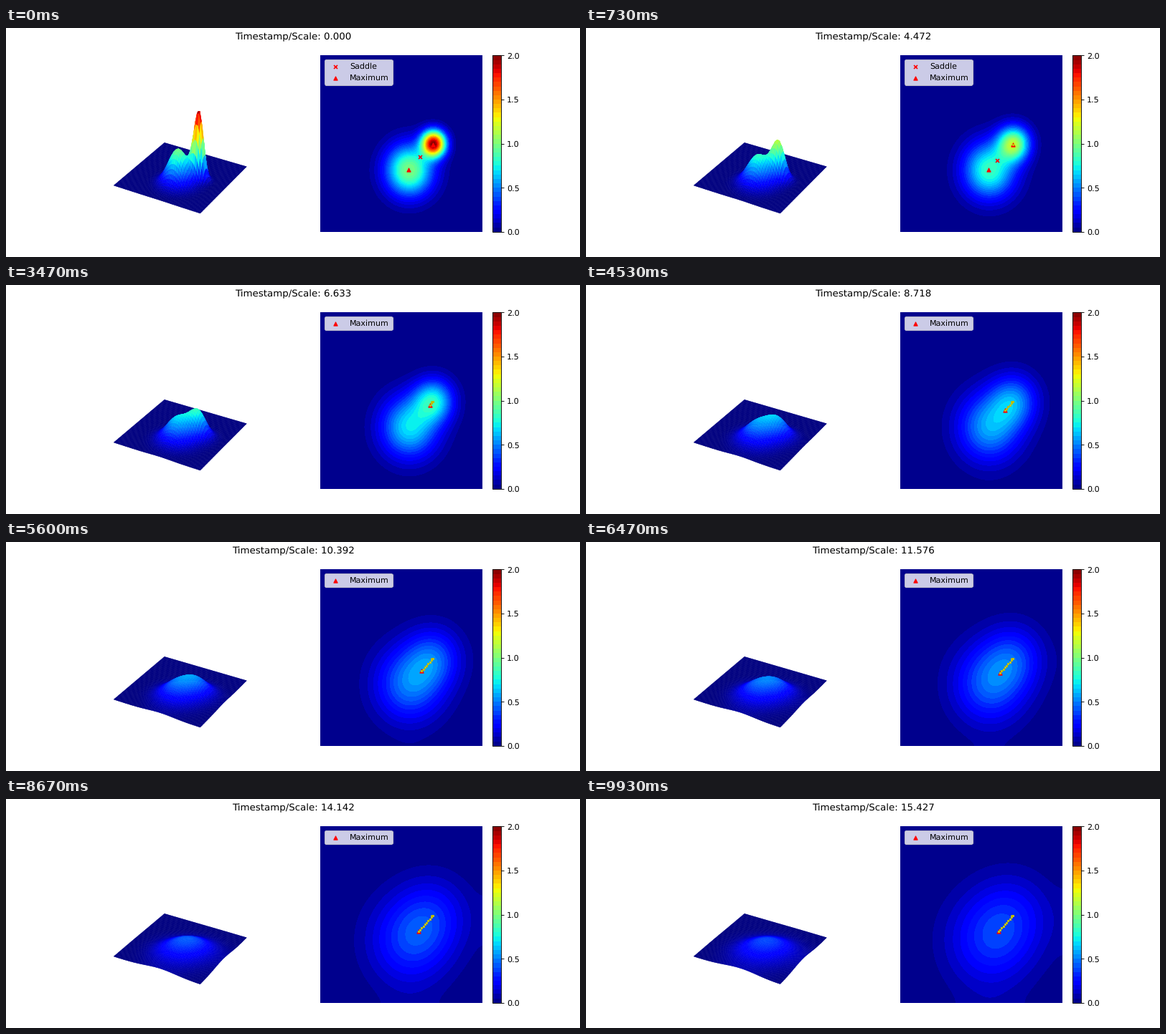
A matplotlib script for the animation above (9990 ms loop, 800 by 320 pixels).

```python
import numpy as np
import matplotlib.pyplot as plt
from matplotlib.animation import FuncAnimation
from matplotlib.collections import PolyCollection
from matplotlib.colors import Normalize

plt.rcParams['text.hinting'] = 'none'

N = 100
FRAMES, LOOP_MS = 150, 9990
EVENT, HOLD = 19, 30            # step of the collapse, extra frames it is held

grid = np.linspace(0, 100, N)
STEP = grid[1]
TALL, WIDE = np.array([70, 50]), np.array([55, 35])
BLOBS = [(1.9, TALL, 5), (1.0, WIDE, 10)]       # amplitude, centre, sigma
LEVELS = np.linspace(0, 2, 41)

norm = Normalize(0, 2)
cmap = plt.get_cmap('jet')


def bell(c, var):
    """1D Gaussian on the grid, reflected at both borders."""
    images = (c, -STEP - c, 200 + STEP - c)
    return sum(np.exp(-(grid - m) ** 2 / (2 * var)) for m in images)


def spread(sigma, k):
    return sigma ** 2 + 2 * k * STEP ** 2


def field(k):
    z = 0
    for amp, (cx, cy), sigma in BLOBS:
        var = spread(sigma, k)
        z = z + amp * sigma ** 2 / var * np.outer(bell(cy, var), bell(cx, var))
    return z


def snap(p):
    return np.round(np.asarray(p) / STEP) * STEP


def along(u):
    return snap(WIDE + u * (TALL - WIDE))


STAR = along(.235)


def ridge_points(k):
    """Lower maximum and saddle, sampled on the line joining the two centres."""
    u = np.arange(13) / 15
    dist = np.hypot(*(TALL - WIDE))
    f = 0
    for (amp, _, sigma), pos in zip(BLOBS, (1, 0)):
        var = spread(sigma, k)
        f = f + amp * sigma ** 2 / var * np.exp(-((u - pos) * dist) ** 2 / (2 * var))
    down = np.flatnonzero(np.diff(f) < 0)
    if not len(down):
        return STAR, STAR
    return along(u[down[0]]), along(u[down[-1] + 1])


def top_point(z):
    row, col = np.unravel_index(z.argmax(), z.shape)
    return grid[col], grid[row]


def project(x, y, z):
    """Perspective view (elev 30, azim -60) to stage pixels."""
    s3 = np.sqrt(3) / 2
    x, y = (x / 50 - 1) * .5195, (y / 50 - 1) * .5195
    z = (z - 1) * .4286
    depth = 10 - (s3 * (x / 2 - s3 * y) + z / 2)
    px = 244.24 + 1331.9 * (s3 * x + y / 2) / depth
    py = 158.27 - 1331.9 * (-x / 4 + s3 / 2 * y + s3 * z) / depth
    return px, py


# coarse mesh for the surface, quads ordered back to front
pick = np.r_[0:N - 1:2, N - 1]
mx, my = np.meshgrid(grid[pick], grid[pick])


def corners(a):
    quads = [a[:-1, :-1], a[:-1, 1:], a[1:, 1:], a[1:, :-1]]
    return np.stack([q.ravel() for q in quads], axis=1)


order = np.argsort((corners(mx) / 2 - np.sqrt(3) / 2 * corners(my)).mean(axis=1),
                   kind='stable')

fields = [field(k) for k in range(FRAMES - HOLD)]
tops = np.array([top_point(z) for z in fields])

fig = plt.figure(figsize=(10, 4), dpi=80)
title = fig.suptitle('')

view = fig.add_axes([0, 0, 1, 1], zorder=-1)
view.set(xlim=(0, 800), ylim=(320, 0))
view.axis('off')
surface = PolyCollection([], linewidths=.4, edgecolors='face')
view.add_collection(surface, autolim=False)

ax = fig.add_subplot(122)


def draw_map(z):
    return ax.contourf(grid, grid, np.clip(z, 1e-9, 1.9999), LEVELS,
                       cmap=cmap, norm=norm)


heat = draw_map(fields[0])
bar = fig.colorbar(heat, ax=ax, ticks=np.arange(0, 2.1, .5), format='%.1f')
bar.minorticks_off()
ax.set(xlim=(0, 100), ylim=(0, 100))
ax.axis('off')


def points(marker, size, label=None, color='red', z=3):
    return ax.scatter([], [], s=size, c=color, marker=marker, label=label, zorder=z)


saddle = points('x', 20, 'Saddle')
star = points('*', 40, 'Collaspe')
maxima = points('^', 22, 'Maximum')
trail = points('o', 7, color='y', z=4)
trail.set_linewidth(0)
note = ax.text(STAR[0] + 2, STAR[1] - 8, 'Max-Saddle\n Collapse',
               color='red', fontsize=12, zorder=4)


def step_of(i):
    return i if i <= EVENT else max(EVENT, i - HOLD)


def update(i):
    global heat
    k = step_of(i)
    z = fields[k]
    title.set_text(f'Timestamp/Scale: {np.sqrt(2 * k):.3f}')

    mz = z[np.ix_(pick, pick)]
    px, py = project(mx, my, mz)
    surface.set_verts(np.stack([corners(px), corners(py)], axis=-1)[order])
    surface.set_facecolor(cmap(norm(corners(mz).mean(axis=1)[order])))

    heat.remove()
    heat = draw_map(z)

    before, event = k < EVENT, k == EVENT
    peaks = [tops[k]]
    if before:
        low, pas = ridge_points(k)
        peaks.append(low)
        saddle.set_offsets([pas])
    maxima.set_offsets(peaks)
    star.set_offsets([STAR])
    trail.set_offsets(tops[:k + 1])
    saddle.set_visible(before)
    trail.set_visible(k > 0)
    star.set_visible(event)
    note.set_visible(event)

    shown = [saddle] * before + [star] * event + [maxima]
    ax.legend(handles=shown, loc='upper left')
    return []


anim = FuncAnimation(fig, update, frames=FRAMES, interval=LOOP_MS / FRAMES,
                     init_func=lambda: update(0), repeat=True, repeat_delay=0,
                     blit=False)
plt.show()
```
